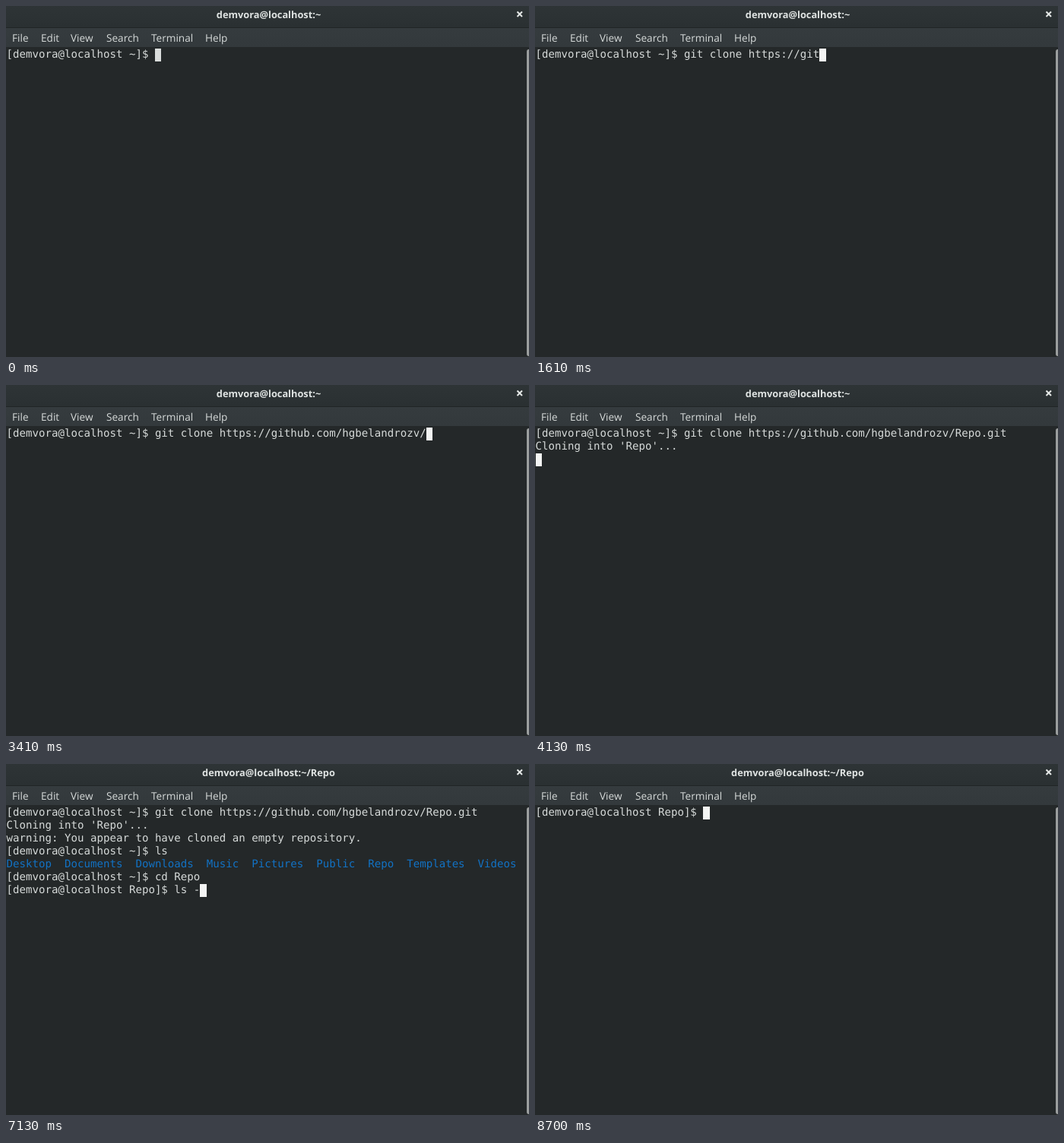
Recreate the animation shown at these times as an HTML page. Size 688 by 462 pixels, loop 9250 ms.

```html
<!DOCTYPE html>
<html lang="en">
<head>
<meta charset="utf-8">
<title>Terminal</title>
<style>
  html, body { margin: 0; width: 100%; height: 100%; overflow: hidden; background: #242829; }
  body { position: relative; text-rendering: geometricPrecision; color: #d6dad9; }
  #bar, #menu { position: absolute; left: 0; width: 688px; font-family: "Open Sans", "Noto Sans", sans-serif; }
  #bar { top: 0; height: 28px; background: linear-gradient(#2e3436, #2a3032); border-bottom: 1px solid #202526; }
  #title { position: absolute; left: 0; width: 691px; top: 0; line-height: 22px; text-align: center; font-size: 12.8px; font-weight: 700; color: #dfe3e2; }
  #bar svg { position: absolute; left: 671px; top: 6px; }
  #menu { top: 29px; height: 25px; background: linear-gradient(#353b3e, #33393c); font-size: 13.6px; line-height: 25px; }
  #menu span { position: absolute; top: 0; }
  #screen { position: absolute; left: .5px; top: 56px; margin: 0; font: 14.12px/17px "DejaVu Sans Mono", monospace; }
  #screen b { font-weight: 400; color: #1272c4; }
  #screen i { display: inline-block; width: 8.5px; height: 17px; vertical-align: top; background: #f4f5f4; }
  #screen i.idle { background: #dadddc; }
  #scroll { position: absolute; left: 684.5px; top: 57px; width: 6px; height: 404px; border-radius: 3px; background: #9b9e9e; }
</style>
</head>
<body>
<div id="bar">
  <div id="title"></div>
  <svg width="10" height="10"><path d="M1.5 1.5l6.5 6.5M8 1.5L1.5 8" stroke="#e6e9e8" stroke-width="2"/></svg>
</div>
<div id="menu">
  <span style="left:8px">File</span><span style="left:46px">Edit</span><span style="left:85px">View</span>
  <span style="left:132px">Search</span><span style="left:191px">Terminal</span><span style="left:262px">Help</span>
</div>
<pre id="screen"></pre>
<div id="scroll"></div>
<script>
const LOOP = 9250;
const user = "demvora", host = user + "@localhost";
const home = `[${host} ~]$ `, repo = `[${host} Repo]$ `;
const clone = "git clone https://github.com/hgbelandrozv/Repo.git";
const folders = "Desktop  Documents  Downloads  Music  Pictures  Public  Repo  Templates  Videos";
const entry = (mode, size, name) => `${mode} ${user} ${user} ${size} Mar 14 10:42 <b>${name}</b>\n`;
const listing = "total 4\n" + entry("drwxrwxr-x.  3", "  18", ".") +
  entry("drwx------. 15", "4096", "..") + entry("drwxrwxr-x.  7", " 119", ".git");

// Uneven typing rhythm: [time, letters typed]
const rhythm = [[150, 1], [1020, 12], [1100, 13], [1610, 21], [1980, 26], [2060, 27],
  [2640, 33], [2950, 37], [3020, 38], [3890, 49], [3970, 50]];

function letters(t) {
  if (t < rhythm[0][0]) return 0;
  const k = rhythm.findIndex(p => p[0] > t);
  if (k < 0) return clone.length;
  const [t0, n0] = rhythm[k - 1], [t1, n1] = rhythm[k];
  return Math.floor(n0 + (n1 - n0) * (t - t0) / (t1 - t0));
}

const typed = (text, t, start, step) => text.slice(0, Math.max(0, Math.floor((t - start) / step) + 1));

function content(t) {
  if (t >= 8700) return repo;
  let out = home + clone.slice(0, letters(t));
  const add = (time, text) => { if (t >= time) out += text; };
  add(4050, "\n");
  add(4130, "Cloning into 'Repo'...\n");
  add(4590, "warning: You appear to have cloned an empty repository.\n");
  add(4670, home + typed("ls", t, 5050, 70));
  add(5340, `\n<b>${folders}</b>\n` + home + typed("cd Repo", t, 5820, 78));
  add(6520, "\n" + repo + typed("ls -la", t, 6900, 76));
  add(7440, "\n");
  add(7510, listing + repo + typed("clear", t, 7910, 78));
  return out;
}

const screenEl = document.getElementById("screen"), titleEl = document.getElementById("title");
const start = performance.now();
let last = "";

function draw() {
  const t = (performance.now() - start) % LOOP;
  const idle = t < 150 || (t >= 5340 && t < 5650);
  const html = content(t) + `<i class="${idle ? "idle" : ""}"></i>`;
  if (html !== last) {
    screenEl.innerHTML = last = html;
    titleEl.textContent = host + (t < 6520 ? ":~" : ":~/Repo");
  }
  requestAnimationFrame(draw);
}
draw();
</script>
</body>
</html>
```
